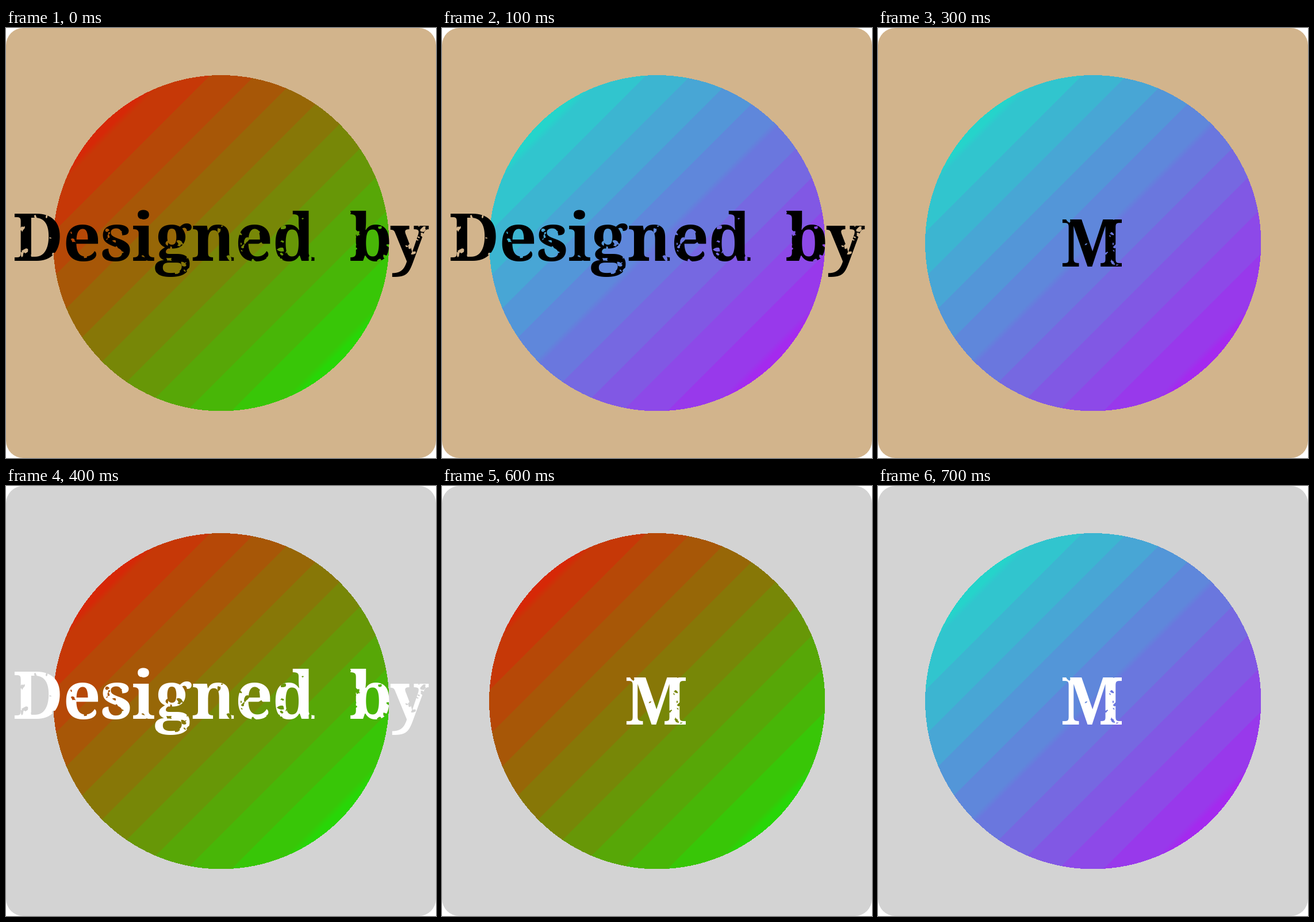
An HTML page that plays this animation: 748x748 px, repeating every 0.8 s.

```html
<!DOCTYPE html>
<html lang="en">
<head>
<meta charset="utf-8">
<title>Designed by M</title>
<style>
  html, body { margin: 0; width: 100%; height: 100%; overflow: hidden; background: #fff; }
  svg { display: block; width: 100%; height: 100%; }
  text {
    font: bold 115px "Noto Serif", "Liberation Serif", serif;
    text-anchor: middle;
    letter-spacing: -0.8px;
  }
</style>
</head>
<body>
<svg viewBox="0 0 748 748" xmlns="http://www.w3.org/2000/svg">
  <defs id="defs">
    <mask id="worn" maskUnits="userSpaceOnUse" x="0" y="0" width="748" height="748">
      <rect width="748" height="748" fill="#fff"/>
      <path id="chips"/>
    </mask>
  </defs>
  <rect id="card" width="748" height="748" rx="30"/>
  <circle id="disc" cx="374.25" cy="374.25" r="292.2" shape-rendering="crispEdges"/>
  <g id="ink" mask="url(#worn)">
    <g id="words">
      <text x="274.5" y="405">Designed</text>
      <text x="666" y="405">by</text>
    </g>
    <text id="letter" x="372" y="415">M</text>
  </g>
</svg>
<script>
const NS = 'http://www.w3.org/2000/svg';
const STEP = 100;
const BANDS = 12;
const BAND_WIDTH = 77.6;
const [defs, chips, card, disc, ink, words, letter] =
  ['defs', 'chips', 'card', 'disc', 'ink', 'words', 'letter'].map(id => document.getElementById(id));

function add(parent, tag, attrs) {
  const el = document.createElementNS(NS, tag);
  for (const key in attrs) el.setAttribute(key, attrs[key]);
  return parent.appendChild(el);
}

// Even diagonal colour bands; every `softEvery`-th edge is blended.
function addBands(id, from, to, softEvery) {
  const grad = add(defs, 'linearGradient', {
    id, gradientUnits: 'userSpaceOnUse', x1: 82, y1: 82, x2: 666, y2: 666
  });
  const stop = (edge, shift, color) => add(grad, 'stop', {
    offset: 0.5 + ((edge - BANDS / 2) * BAND_WIDTH + shift) / 1168,
    'stop-color': color
  });
  for (let i = 0; i < BANDS; i++) {
    const mix = from.map((v, c) => v + (to[c] - v) * i / (BANDS - 1));
    const color = `rgb(${mix.map(Math.round)})`;
    const blend = edge => (edge - 1) % softEvery ? 0 : 8;
    if (i > 0) stop(i, blend(i), color);
    if (i < BANDS - 1) stop(i + 1, -blend(i + 1), color);
  }
}

let seed = 17;
const random = () => (seed = seed * 16807 % 2147483647) / 2147483647;

// One ragged, elongated flake of missing ink.
function chip(x, y, r) {
  const turn = random() * Math.PI;
  const points = Array.from({ length: 9 }, (_, i) => {
    const a = i / 9 * Math.PI * 2;
    const len = r * (0.55 + 0.8 * random());
    const u = Math.cos(a) * len * 1.3, v = Math.sin(a) * len * 0.75;
    return [
      (x + u * Math.cos(turn) - v * Math.sin(turn)).toFixed(1),
      (y + u * Math.sin(turn) + v * Math.cos(turn)).toFixed(1)
    ];
  });
  return `M${points.join('L')}Z`;
}

function draw(time) {
  const step = Math.floor(time / STEP) % 8;
  const pale = step >= 4;
  const single = step % 4 >= 2;
  card.setAttribute('fill', pale ? '#d3d3d3' : '#d2b48c');
  disc.setAttribute('fill', step % 2 ? 'url(#cool)' : 'url(#warm)');
  ink.setAttribute('fill', pale ? '#fff' : '#000');
  words.style.display = single ? 'none' : '';
  letter.style.display = single ? '' : 'none';
}

addBands('warm', [214, 40, 7], [40, 214, 7], 10);
addBands('cool', [37, 212, 203], [164, 42, 238], 5);

let wear = '';
for (let i = 0; i < 170; i++) {
  wear += chip(14 + 722 * random(), 318 + 114 * random(), 1.3 + 4 * random() ** 2);
}
chips.setAttribute('d', wear);

const start = performance.now();
function tick() {
  draw(performance.now() - start);
  requestAnimationFrame(tick);
}
tick();
</script>
</body>
</html>
```
